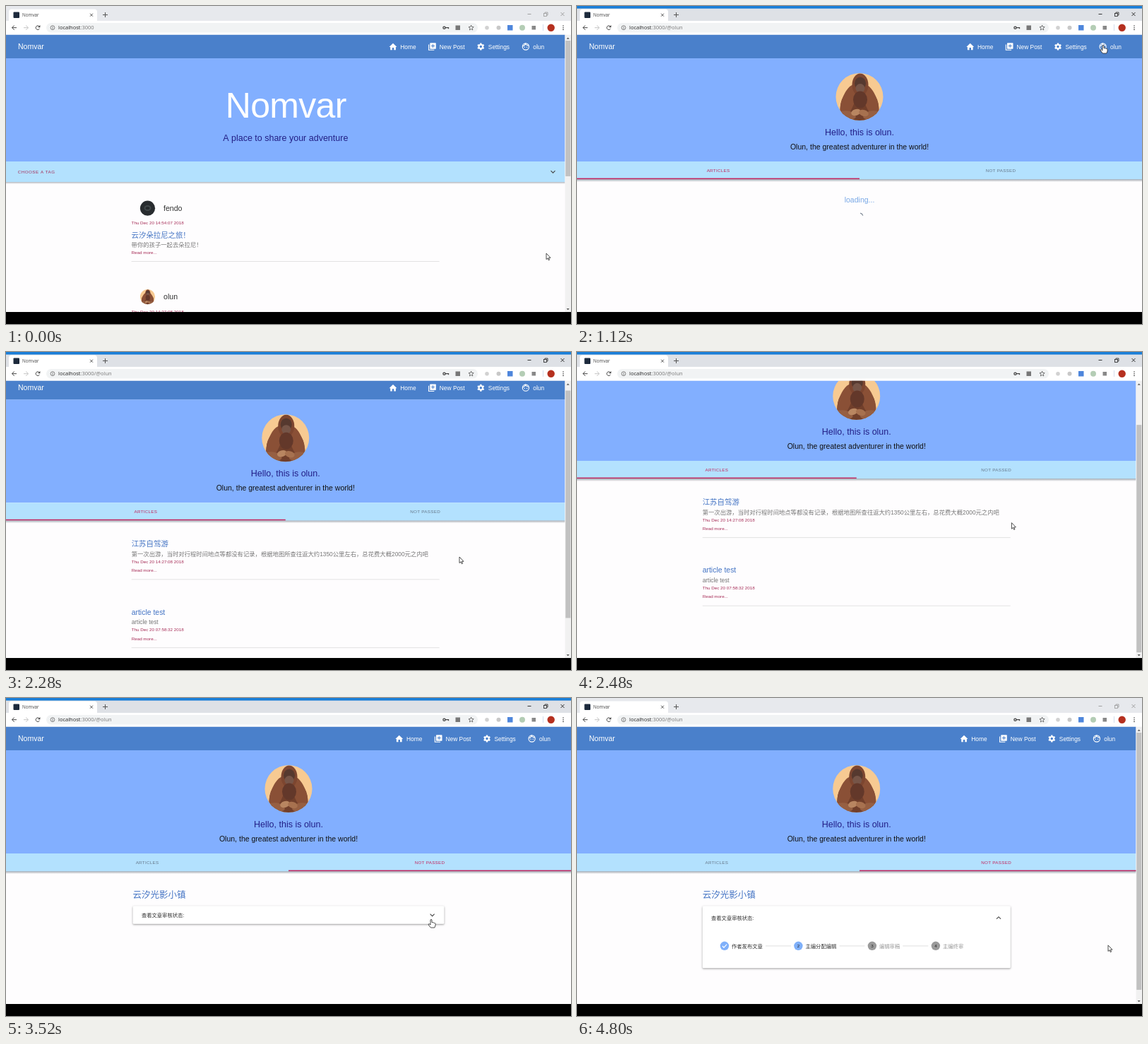
Recreate the animation shown at these times as an HTML page with a canvas. Size 800 by 450 pixels, loop 4.84 s.

```html
<!DOCTYPE html>
<html lang="en">
<head>
<meta charset="utf-8">
<title>Nomvar</title>
<style>
html, body { margin: 0; width: 100%; height: 100%; overflow: hidden; background: #000; }
canvas { display: block; width: 800px; height: 450px; }
</style>
</head>
<body>
<canvas id="stage" width="800" height="450"></canvas>
<script>
const g = document.getElementById('stage').getContext('2d');
const LOOP = 4840, TAU = Math.PI * 2;
const SANS = '"Liberation Sans", "Noto Sans CJK SC", "Noto Sans CJK", sans-serif';
const UI = '"Open Sans", sans-serif';
const WINE = '#a52a55', PINK = '#c2255c', LINK = '#4474c4', INDIGO = '#221f86';
const BAR = '#4a80cb', SKY = '#82afff', PALE = '#b3e1fe';

// Pointer path: time, x, y
const PATH = [
  [0, 765, 350], [80, 765, 350], [520, 745, 55], [1160, 745, 55], [1640, 695, 188],
  [1760, 695, 188], [2280, 642, 290], [2560, 609, 230], [2740, 608, 230], [2800, 604, 180],
  [2920, 604, 180], [3300, 602, 313], [4160, 602, 313], [4680, 752, 349], [4840, 752, 350]
];
const HANDS = [[470, 1190], [2520, 2770], [3270, 4200]];

const clamp = v => Math.max(0, Math.min(1, v));
const ease = v => v * v * (3 - 2 * v);
const ramp = (t, a, b) => ease(clamp((t - a) / (b - a)));
const mix = (a, b, p) => a + (b - a) * p;

function rect(x, y, w, h, c) { g.fillStyle = c; g.fillRect(x, y, w, h); }
function disc(x, y, r, c) { g.fillStyle = c; g.beginPath(); g.arc(x, y, r, 0, TAU); g.fill(); }
function oval(x, y, rx, ry, c, rot = 0) { g.fillStyle = c; g.beginPath(); g.ellipse(x, y, rx, ry, rot, 0, TAU); g.fill(); }
function ring(x, y, r, c, w, a = 0, b = TAU) { g.strokeStyle = c; g.lineWidth = w; g.beginPath(); g.arc(x, y, r, a, b); g.stroke(); }
function round(x, y, w, h, r, c) { g.fillStyle = c; g.beginPath(); g.roundRect(x, y, w, h, r); g.fill(); }
function line(c, w, ...p) {
  g.strokeStyle = c; g.lineWidth = w; g.beginPath();
  for (let i = 0; i < p.length; i += 2) g.lineTo(p[i], p[i + 1]);
  g.stroke();
}
function poly(c, ...p) {
  g.fillStyle = c; g.beginPath();
  for (let i = 0; i < p.length; i += 2) g.lineTo(p[i], p[i + 1]);
  g.closePath(); g.fill();
}
function text(s, x, y, size, c, align = 'left', gap = 0, font = SANS) {
  g.font = size + 'px ' + font;
  g.letterSpacing = gap + 'px';
  g.textAlign = align;
  g.fillStyle = c;
  g.fillText(s, x, y);
}
function shadow(y, w, h, a) {
  const s = g.createLinearGradient(0, y, 0, y + h);
  s.addColorStop(0, 'rgba(0,20,40,' + a + ')');
  s.addColorStop(1, 'rgba(0,20,40,0)');
  rect(0, y, w, h, s);
}
function chevron(x, y, up, c = '#444') {
  const d = 1.5 * (1 - 2 * up);
  line(c, 1.1, x - 3, y - d, x, y + d, x + 3, y - d);
}

function browser(t) {
  const on = t >= 120 && t < 4600, ink = on ? '#222' : '#999';
  rect(0, 0, 800, 22, on ? '#dee1e6' : '#e7e9ed');
  if (on) rect(0, 0, 800, 3.6, '#1a7ed8');
  round(4, 4.5, 125, 20, [4, 4, 0, 0], '#fff');
  rect(0, 21, 800, 19.5, '#fff');
  round(10.5, 8.5, 8.5, 8.5, 1, '#1d2a3c');
  text('Nomvar', 23, 15, 6.3, '#444', 'left', 0, UI);
  line('#444', .9, 119, 10.7, 123, 14.7); line('#444', .9, 123, 10.7, 119, 14.7);
  line('#555', 1, 137, 12.5, 144, 12.5); line('#555', 1, 140.5, 9, 140.5, 16);
  line(ink, .9, 738.5, 11.5, 743.5, 11.5);
  g.strokeStyle = ink; g.lineWidth = .8;
  g.strokeRect(761.5, 10.5, 4, 4);
  line(ink, .8, 763, 10, 763, 9, 767, 9, 767, 13, 766, 13);
  line(ink, .9, 785.5, 9, 790.5, 14); line(ink, .9, 790.5, 9, 785.5, 14);

  const arrow = (x, d, c) => {
    line(c, 1, x - 3 * d, 30.7, x + 3.3 * d, 30.7);
    line(c, 1, x, 27.5, x - 3.2 * d, 30.7, x, 33.9);
  };
  arrow(11.7, 1, '#444'); arrow(28.3, -1, '#c4c4c4');
  ring(45, 30.7, 2.8, '#444', 1, .5, 5.6);
  poly('#444', 48.4, 27, 48.4, 30.2, 45.2, 30.2);
  round(57, 24, 611, 13.5, 6.7, '#f1f3f4');
  ring(66, 30.7, 2.9, '#666', .8);
  rect(65.6, 30.2, .9, 2.2, '#666'); rect(65.6, 28.8, .9, .8, '#666');
  text('localhost', 74, 33.4, 7.5, '#222', 'left', 0, UI);
  const w = g.measureText('localhost').width;
  text(t < 600 ? ':3000' : ':3000/@olun', 74 + w, 33.4, 7.5, '#777', 'left', 0, UI);

  ring(620.5, 30.7, 1.6, '#444', 1.3);
  line('#444', 1.3, 622, 30.7, 626.5, 30.7, 626.5, 32.3);
  rect(636.5, 27.5, 6.5, 6.5, '#777');
  g.beginPath();
  for (let i = 0; i < 10; i++) {
    const r = i % 2 ? 1.7 : 3.8, a = i * Math.PI / 5 - Math.PI / 2;
    g.lineTo(658.6 + r * Math.cos(a), 30.9 + r * Math.sin(a));
  }
  g.closePath(); g.strokeStyle = '#555'; g.lineWidth = .8; g.stroke();
  disc(681, 30.7, 2.8, '#d2d2d2'); disc(697.5, 30.7, 3, '#c8c8c8');
  rect(710, 27, 7.5, 7.5, '#4e86dc'); disc(731, 30.7, 4, '#b4cdb5');
  rect(744.5, 28, 5.5, 5.5, '#888');
  rect(760, 26, .8, 9, '#c8d4e8');
  disc(771.7, 30.7, 5.2, '#b5301f');
  for (const y of [28, 30.7, 33.4]) disc(789, y, .8, '#444');
}

function appBar(W) {
  const d = W < 800 ? -8.7 : 0, white = '#fff';
  rect(0, 40, W, 34, BAR);
  text('Nomvar', 17, 61.3, 10.5, white);
  text('Home', 567 + d, 60.5, 8.4, white);
  text('New Post', 622.5 + d, 60.5, 8.4, white);
  text('Settings', 691.5 + d, 60.5, 8.4, white);
  text('olun', 755 + d, 60.5, 8.4, white);

  g.save(); g.translate(d, 0);
  poly(white, 551.3, 58, 556.7, 52.7, 562.2, 58, 560.6, 58, 560.6, 62.2, 558, 62.2, 558, 59, 555.5, 59, 555.5, 62.2, 552.9, 62.2, 552.9, 58);
  line(white, 1.1, 607.3, 54.5, 607.3, 62.3, 615, 62.3);
  round(609, 52.3, 8.5, 8.5, .8, white);
  line(BAR, 1, 610.8, 56.5, 615.7, 56.5); line(BAR, 1, 613.2, 54, 613.2, 59);
  for (let i = 0; i < 6; i++) {
    const a = i * Math.PI / 3 + Math.PI / 6;
    line(white, 2.4, 681, 57.5, 681 + 5 * Math.cos(a), 57.5 + 5 * Math.sin(a));
  }
  disc(681, 57.5, 3.7, white); disc(681, 57.5, 1.7, BAR);
  ring(744.6, 57.5, 4.6, white, 1.1);
  g.beginPath(); g.moveTo(740.4, 56.8); g.quadraticCurveTo(743.5, 56, 744, 53.3);
  g.quadraticCurveTo(746, 56.2, 748.8, 55.8); g.stroke();
  disc(743, 58.3, .7, white); disc(746.3, 58.3, .7, white);
  g.restore();
}

function ape(x, y, r) {
  g.save();
  g.translate(x, y); g.scale(r / 33.5, r / 33.5);
  g.beginPath(); g.arc(0, 0, 33.5, 0, TAU); g.clip();
  rect(-34, -34, 68, 68, '#f7ca92');
  oval(0, 14, 27, 27, '#713f2b');
  oval(-16, 6, 9, 24, '#8a5036', .35); oval(16, 6, 9, 24, '#8a5036', -.35);
  oval(1, -17, 11.5, 16, '#7d4630');
  oval(1, -19, 8, 9, '#56392f'); oval(1, -12, 6.5, 6.5, '#765548');
  oval(1, 4, 10, 12, '#63382a');
  oval(-17, 26, 12, 6, '#965f42', .2); oval(17, 26, 12, 6, '#965f42', -.2);
  oval(-5, 22, 7, 4.5, '#b98661', -.3); oval(6, 23, 7, 4.5, '#a7714f', .3);
  g.restore();
}

const READ = 'Read more...';
const small = (s, x, y) => text(s, x, y, 6.25, WINE);

function home(W) {
  const c = W / 2, x = 177.6;
  rect(0, 74, W, 146, SKY);
  text('Nomvar', c + .5, 158, 50, '#fff', 'center', -.7);
  text('A place to share your adventure', c, 191, 12.5, INDIGO, 'center');
  shadow(249, W, 3, .3);
  rect(0, 220, W, 29, PALE);
  text('CHOOSE A TAG', 16.7, 236.7, 6.2, WINE, 'left', .52);
  chevron(774.5, 234.7, 0);
  disc(200.5, 286.2, 10.6, '#282c2f');
  oval(200.5, 286, 5, 4, '#41484a'); oval(200.5, 286, 3, 2, '#262a2d');
  text('fendo', 223, 290, 10.6, '#333');
  small('Thu Dec 20 14:54:07 2018', x, 309.2);
  text('云汐朵拉尼之旅！', x, 328, 10.4, LINK);
  text('带你的孩子一起去朵拉尼！', x, 341.3, 8.33, '#777');
  small(READ, x, 351);
  rect(x, 361, 436, .8, '#dcdcdc');
  ape(200.5, 411.6, 10.6);
  text('olun', 223, 415.4, 10.6, '#333');
  small('Thu Dec 20 14:27:08 2018', x, 434.6);
}

function loading(y, t) {
  text('loading...', 400, y, 10.5, '#78a8e6', 'center');
  const a = (50 + (t - 680) * .528) * Math.PI / 180;
  const len = .15 + 1.05 * Math.sin(Math.PI * (t - 680) / 720) ** 2;
  ring(400, y + 20, 5, '#7d8793', 1.2, a, a + len);
}

function post(x, y, title, body, date) {
  text(title, x, y, 10.45, LINK);
  text(body, x, y + 13.7, 8.33, '#777');
  small(date, x, y + 23.5);
  small(READ, x, y + 36);
  rect(x, y + 46.3, 436, .8, '#dcdcdc');
}

function profile(W, t) {
  const c = W / 2, second = t >= 2760;
  rect(0, 74, W, 146, SKY);
  ape(c, 128.5, 33.5);
  text('Hello, this is olun.', c, 182.5, 12.5, INDIGO, 'center');
  text('Olun, the greatest adventurer in the world!', c, 202.6, 10.5, '#111', 'center');
  shadow(245, W, 4, .38);
  rect(0, 220, W, 25.2, PALE);
  const fade = 1 - ramp(t, 2840, 2960);
  if (second && fade > 0) {
    g.save();
    g.beginPath(); g.rect(400, 220, 400, 25); g.clip();
    g.globalAlpha = .28 * fade;
    disc(608, 232, 32 * clamp((t - 2700) / 100), PINK);
    g.restore();
    g.save();
    g.globalAlpha = fade;
    g.strokeStyle = '#86b8ef'; g.lineWidth = 1.4;
    g.strokeRect(400.3, 220.5, 399, 24);
    g.restore();
  }
  const tab = (s, x, on) => text(s, x, 235, 6.25, on ? PINK : '#66788a', 'center', .28);
  tab('ARTICLES', W / 4, !second);
  tab('NOT PASSED', W * .75, second);
  const p = ramp(t, 2800, 2920);
  rect(400 * p, 243.6, second ? mix(395.7, 400, p) : c, 1.5, PINK);
}

function articles(W) {
  const x = W * .225 - .4;
  post(x, 282, '江苏自驾游', '第一次出游，当时对行程时间地点等都没有记录，根据地图所查往返大约1350公里左右，总花费大概2000元之内吧', 'Thu Dec 20 14:27:08 2018');
  post(x, 378.4, 'article test', 'article test', 'Thu Dec 20 07:58:32 2018');
}

function review(W, p) {
  const x = W * .225 - .4, w = W * .55 + .8, h = mix(25.5, 88, p);
  text('云汐光影小镇', x, 283, 12.5, LINK);
  g.save();
  g.shadowColor = 'rgba(0,0,0,.4)'; g.shadowBlur = 2.5; g.shadowOffsetY = .9;
  round(x, 294.3, w, h, 1.5, '#fff');
  g.restore();
  text('查看文章审核状态:', x + 12.3, mix(309.8, 313.8, p), 7.3, '#333');
  chevron(x + w - 16.8, mix(307.2, 311.2, p), p);
  if (p <= 0) return;
  g.save();
  g.beginPath(); g.rect(x, 294.3, w, h); g.clip();
  const steps = [['作者发布文章', 31.2], ['主编分配编辑', 135.7], ['编辑审稿', 240.2], ['主编终审', 330.2]];
  steps.forEach(([s, dx], i) => {
    const on = i < 2, cx = x + dx;
    disc(cx, 350.8, 6.2, on ? '#7fb0fa' : '#9a9a9a');
    if (i) text(i + 1, cx, 353.1, 6.2, '#222', 'center');
    else line('#fff', 1.2, cx - 3, 351, cx - .9, 353.1, cx + 3.2, 348.7);
    text(s, cx + 10, 353.6, 7.35, on ? '#333' : '#999');
    if (i < 3) rect(cx + 10 + s.length * 7.35 + 4, 350.5, 36, .8, '#d8d8d8');
  });
  g.restore();
}

function scrollbar(page, scroll) {
  rect(791.5, 40.5, 8.5, 392.5, '#f1f1f1');
  rect(792.3, 49 + scroll * 376 / page, 7, 376 * 392 / page, '#c1c1c1');
  poly('#555', 793.7, 46.8, 795.7, 44.6, 797.7, 46.8);
  poly('#555', 793.7, 428, 795.7, 430.2, 797.7, 428);
}

function pointer(t) {
  let i = 1;
  while (i < PATH.length - 1 && PATH[i][0] < t) i++;
  const a = PATH[i - 1], b = PATH[i], p = ramp(t, a[0], b[0]);
  g.save();
  g.translate(mix(a[1], b[1], p), mix(a[2], b[2], p));
  g.fillStyle = '#fff'; g.strokeStyle = '#222'; g.lineWidth = .8; g.lineJoin = 'round';
  const hand = HANDS.some(h => t >= h[0] && t < h[1]);
  g.stroke(new Path2D());
  const shape = new Path2D(hand
    ? 'M-1 1Q0-.6 1 1V4.6Q2.1 3.8 2.8 5Q4 4.4 4.5 5.5Q5.8 5 6 6.4V9L4.8 12H-.6L-3.8 8Q-4.2 6.4-2.6 6.8L-1 8Z'
    : 'M0 0V8.6L2 6.8L3.3 9.8L4.6 9.2L3.3 6.3H6Z');
  g.fill(shape); g.stroke(shape);
  g.restore();
}

function draw(t) {
  const open = ramp(t, 3640, 3760);
  const listed = t >= 1960 && t < 2760;
  const page = t < 600 ? 768 : listed ? 458 : open > .8 ? 405 : 0;
  const W = page ? 791.5 : 800;
  let scroll = 0;
  if (listed) scroll = 66 * (ramp(t, 2240, 2446) - ramp(t, 2480, 2640));
  rect(0, 0, 800, 450, '#fefdfe');
  g.save();
  g.beginPath(); g.rect(0, 40.5, 800, 392.5); g.clip();
  g.translate(0, -scroll);
  if (t < 600) home(W);
  else if (t < 840) { shadow(74, W, 4, .4); loading(107, t); }
  else {
    profile(W, t);
    if (t < 1960) loading(278, t);
    else if (listed) articles(W);
    else review(W, open);
  }
  appBar(W);
  g.restore();
  if (page) scrollbar(page, scroll);
  browser(t);
  rect(0, 433, 800, 17, '#000');
  pointer(t);
}

const start = performance.now();
function tick() {
  draw((performance.now() - start) % LOOP);
  requestAnimationFrame(tick);
}
tick();
</script>
</body>
</html>
```
